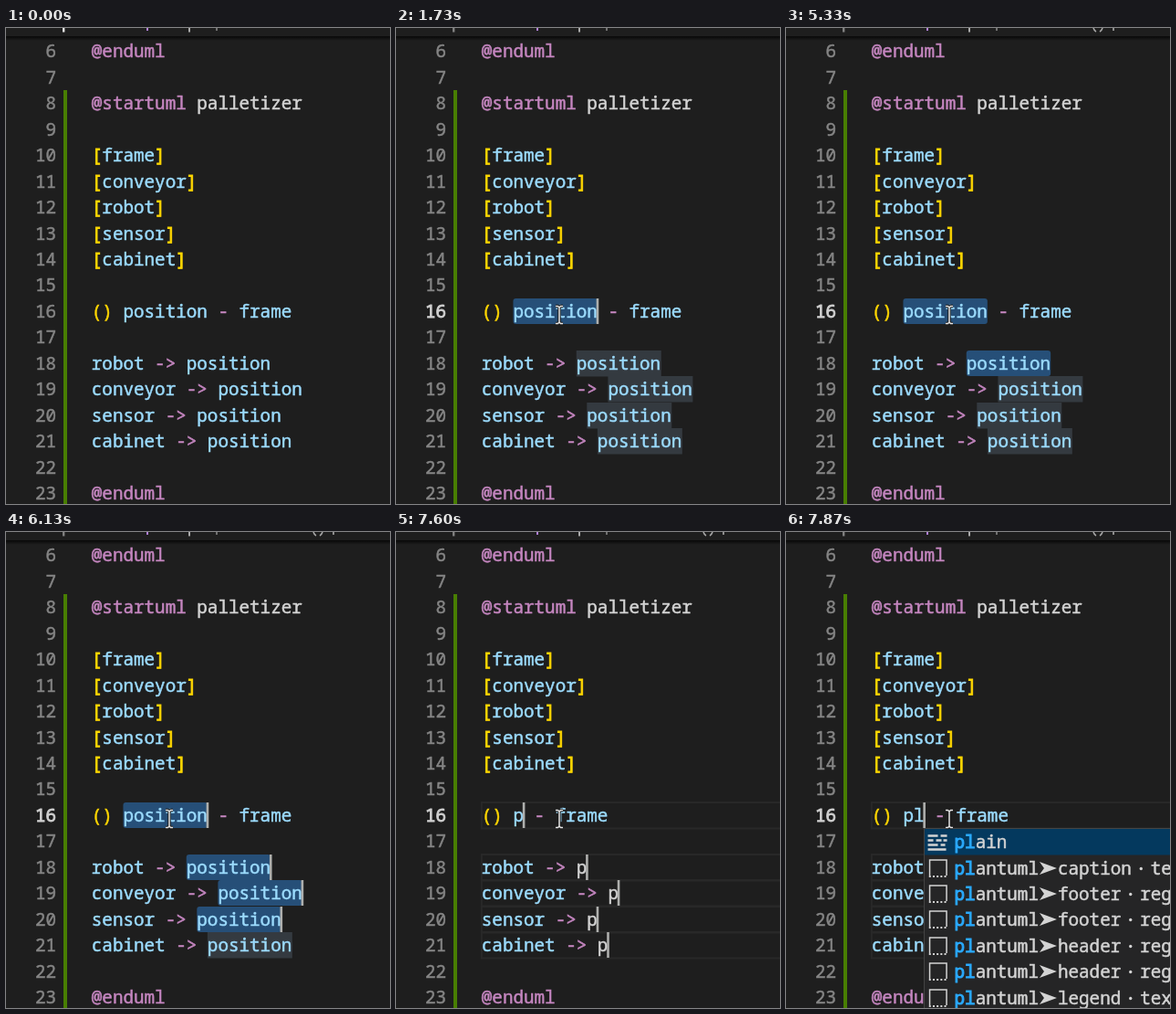
An HTML page that plays this animation: 421x521 px, repeating every 8 s.

```html
<!DOCTYPE html>
<html lang="en">
<head>
<meta charset="utf-8">
<title>Multi-cursor rename</title>
<style>
  html, body { margin: 0; width: 100%; height: 100%; overflow: hidden; background: #1e1e1e; }
  svg { display: block; width: 421px; height: 521px; }
  text { font: 19.25px "Noto Sans Mono", monospace; white-space: pre; }
</style>
</head>
<body>
<svg id="stage" viewBox="0 0 421 521" xmlns="http://www.w3.org/2000/svg">
  <defs>
    <linearGradient id="shade" x1="0" y1="0" x2="0" y2="1">
      <stop offset="0" stop-color="#000" stop-opacity=".75"/>
      <stop offset="1" stop-color="#000" stop-opacity="0"/>
    </linearGradient>
  </defs>
  <g id="editor"></g>
  <rect width="421" height="9" fill="#1e1e1e"/>
  <rect y="9" width="421" height="5" fill="url(#shade)"/>
  <rect id="hover" x="62" width="2.4" height="4.5"/>
  <rect x="154" width="2" height="3" fill="#b180d7"/>
  <rect x="200" width="2" height="4.5" fill="#a9a9a9"/>
  <rect x="230" width="2" height="3" fill="#707070"/>
  <g id="crumb" fill="none" stroke="#a9a9a9" stroke-width="1.6">
    <path d="M337 0q1 3 3 4M347 0q-1 3 -3 4M359 0v3"/>
  </g>
  <g id="popup"></g>
  <g id="mouse" fill="none">
    <path id="beam" d="M-4 -9.5h2.5L0 -8 1.5 -9.5H4M0 -8V8M-4 9.5h2.5L0 8 1.5 9.5H4" stroke="#1a1a1a" stroke-width="3.4"/>
    <path d="M-4 -9.5h2.5L0 -8 1.5 -9.5H4M0 -8V8M-4 9.5h2.5L0 8 1.5 9.5H4" stroke="#e4e4e4" stroke-width="1.5"/>
  </g>
</svg>
<script>
const LOOP = 8000, CH = 11.55, LH = 28.45, LEFT = 93.8;
const PINK = '#c586c0', BLUE = '#9cdcfe', GOLD = '#ffd700', PLAIN = '#d4d4d4';
const $ = id => document.getElementById(id);
const colX = c => LEFT + c * CH;
const topY = n => Math.round(11.4 + (n - 6) * LH);

const lines = ['@enduml', '', '@startuml palletizer', '', '[frame]', '[conveyor]', '[robot]',
  '[sensor]', '[cabinet]', '', '() # - frame', '', 'robot -> #', 'conveyor -> #', 'sensor -> #',
  'cabinet -> #', '', '@enduml'];
const hits = [16, 18, 19, 20, 21].map(n => ({ n, col: lines[n - 6].indexOf('#') }));
const pickTimes = [1600, 4870, 5530, 6130, 6600];
const blinks = [2200, 2670, 3200, 3730, 4200, 4670, 5330, 5530, 6000, 6130, 7130, 7600];
const items = ['caption te', 'footer reg', 'footer reg', 'header reg', 'header reg', 'legend tex'];

const rect = (x, y, w, h, fill, extra = '') =>
  `<rect x="${x}" y="${y}" width="${w}" height="${h}" fill="${fill}" ${extra}/>`;
const text = (x, y, fill, s, weight = .5) =>
  `<text x="${x}" y="${y}" fill="${fill}" stroke="${fill}" stroke-width="${weight}">${s.replace('>', '&gt;')}</text>`;

function tint(word, n) {
  if (word[0] === '@' || word[0] === '-') return PINK;
  if (/[[\]()]/.test(word)) return GOLD;
  return word === 'palletizer' || (n > 16 && /^pl?$/.test(word)) ? PLAIN : BLUE;
}

function codeLine(src, n, word, active) {
  const y = topY(n) + 21;
  let out = text(55 - String(n).length * CH, y, active ? '#d0d0d0' : '#858585', String(n), active ? .9 : .5);
  for (const m of src.replace('#', word).matchAll(/@\w+|[[\]()]+|->?|\w+/g))
    out += text(colX(m.index), y, tint(m[0], n), m[0], /[[\]]/.test(m[0]) ? .9 : .5);
  return out;
}

function editor(s) {
  let back = '', front = '';
  hits.forEach(({ n, col }, i) => {
    const x = colX(col), y = topY(n), end = x + s.word.length * CH;
    if (s.typed) {
      back += rect(LEFT, y, 340, LH, 'none', 'stroke="#282828" stroke-width="2"');
    } else if (i < s.picked) {
      back += rect(x, y, 8 * CH, 28, '#264f78', 'rx="3"');
    } else if (s.marked) {
      back += rect(x, y, 8 * CH + .6, LH, '#343a40');
    }
    if (i < s.picked && s.caret) front += rect(end - 1.2, y, 2.6, 28, '#aeafad');
  });
  const code = lines.map((l, i) => codeLine(l, i + 6, s.word, s.picked && i === 10)).join('');
  return back + rect(63, 68, 4, 453, '#487e02') + code + front;
}

// One completion row: the typed prefix is tinted and bold.
function label(x, y, s, n) {
  return text(x, y, '#2aaaff', s.slice(0, n), 1) + text(x + n * CH, y, PLAIN, s.slice(n));
}

function popup(s) {
  if (!s.list) return '';
  const x = colX(3 + s.word.length), n = s.word.length, lx = x + 33;
  let out = rect(x, 324.5, 300, 220, '#252526', 'stroke="#454545"') + rect(x + .5, 325, 300, 28.5, '#04395e');
  out += `<path d="M${x + 4} 332.5h11m3 0h7M${x + 4} 337.5h6m3 0h6m2 0h4M${x + 4} 342.5h11m3 0h5M${x + 4} 347.5h20"
    stroke="#d4d4d4" stroke-width="2.4" fill="none"/>` + label(lx, 346, 'plain', n);
  items.forEach((item, i) => {
    const [name, kind] = item.split(' '), y = Math.round(374.5 + i * LH);
    const nx = lx + 8 * CH + 21, end = nx + name.length * CH;
    out += `<path d="M${x + 6} ${y + 1}v-17h18.5v17" stroke="#d4d4d4" stroke-width="1.5" fill="none"/>
      <path d="M${x + 5.2} ${y + 2}h20" stroke="#d4d4d4" stroke-width="1.8" stroke-dasharray="2 2.2"/>`;
    out += label(lx, y, 'plantuml', n);
    out += `<path d="M${nx - 20} ${y - 14}l19 7 -19 7 5 -7z" fill="${PLAIN}"/>`;
    out += text(nx, y, PLAIN, name) + text(end + 21, y, PLAIN, kind);
    out += `<circle cx="${end + 10.5}" cy="${y - 6.5}" r="1.7" fill="${PLAIN}"/>`;
  });
  return out;
}

function mousePos(t) {
  const k = Math.max(0, Math.min(11, Math.floor((t - 730) / 67) + 1)) / 11;
  const p = k * k * (3 - 2 * k);
  return [110 + 69 * p * p, -14 + 328 * p];
}

let last = '';
function draw(t) {
  const s = {
    word: t < 7600 ? 'position' : t < 7870 ? 'p' : 'pl',
    typed: t >= 7600,
    picked: pickTimes.filter(p => t >= p).length,
    marked: t >= 1730,
    caret: blinks.filter(b => t >= b).length % 2 === 0,
    list: t >= 7670
  };
  const key = JSON.stringify(s);
  if (key !== last) {
    $('editor').innerHTML = editor(s);
    $('popup').innerHTML = popup(s);
    last = key;
  }
  $('hover').setAttribute('fill', t < 730 ? '#e4e4e4' : '#808080');
  $('crumb').setAttribute('visibility', t >= 1870 ? 'visible' : 'hidden');
  $('mouse').setAttribute('transform', `translate(${mousePos(t)})`);
}

const start = performance.now();
function tick() {
  draw((performance.now() - start) % LOOP);
  requestAnimationFrame(tick);
}
tick();
</script>
</body>
</html>
```
